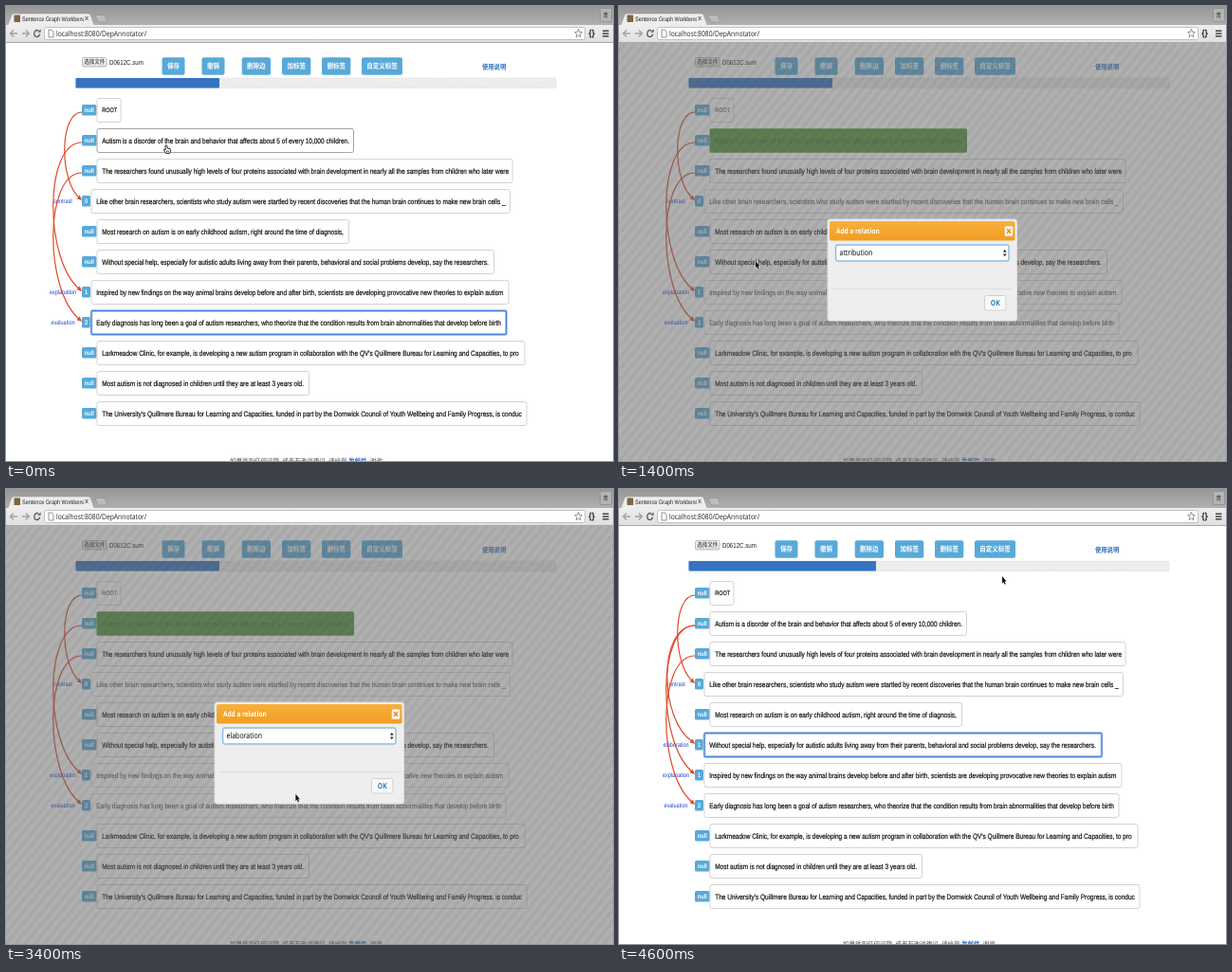
An HTML page with a canvas that plays this animation: 640 by 480 pixels, repeating every 4.8 s.

```html
<!DOCTYPE html>
<html lang="en">
<head>
<meta charset="utf-8">
<title>Sentence tree editor</title>
<style>
html, body { margin: 0; width: 100%; height: 100%; overflow: hidden; background: #fff; }
canvas { display: block; }
</style>
</head>
<body>
<canvas id="stage" width="640" height="480"></canvas>
<script>
const g = document.getElementById('stage').getContext('2d');
g.textRendering = 'geometricPrecision';

const ARIAL = '"Liberation Sans", Arial, sans-serif';
const OPEN = '"Open Sans", sans-serif';
const CJK = '"Noto Sans CJK SC", "Noto Sans CJK", sans-serif';
const BLUE = '#58a9d8', STEP = 200, LOOP = 4800;

// text, right edge of the box, badge ('' means no head yet)
const ROWS = [
  ['ROOT', 121.5, ''],
  ['Autism is a disorder of the brain and behavior that affects about 5 of every 10,000 children.', 367, ''],
  ['The researchers found unusually high levels of four proteins associated with brain development in nearly all the samples from children who later were', 534.5, ''],
  ['Like other brain researchers, scientists who study autism were startled by recent discoveries that the human brain continues to make new brain cells _', 532, '0'],
  ['Most research on autism is on early childhood autism, right around the time of diagnosis,', 362, ''],
  ['Without special help, especially for autistic adults living away from their parents, behavioral and social problems develop, say the researchers.', 515, ''],
  ['Inspired by new findings on the way animal brains develop before and after birth, scientists are developing provocative new theories to explain autism', 530.5, '1'],
  ['Early diagnosis has long been a goal of autism researchers, who theorize that the condition results from brain abnormalities that develop before birth', 527.5, '2'],
  ["Larkmeadow Clinic, for example, is developing a new autism program in collaboration with the QV's Quillmere Bureau for Learning and Capacities, to pro", 547.5, ''],
  ['Most autism is not diagnosed in children until they are at least 3 years old.', 320, ''],
  ["The University's Quillmere Bureau for Learning and Capacities, funded in part by the Dornwick Council of Youth Wellbeing and Family Progress, is conduc", 549.5, '']
];
const BUTTONS = [['保存', 164.5, 24], ['撤销', 206.5, 24], ['删除边', 248.7, 30.3], ['加标签', 291, 30.3], ['删标签', 333, 30.3], ['自定义标签', 375, 43]];
const RELATIONS = ['attribution', 'background', 'cause', 'comparison', 'condition', 'contrast', 'elaboration', 'enablement', 'evaluation',
  'explanation', 'joint', 'manner-means', 'summary', 'temporal', 'topic-change', 'topic-comment', 'same-unit', 'textual'];
// step, x, y of the pointer tip
const PATH = [[0, 169, 147], [3, 169, 147], [5, 144, 269], [8, 144, 269], [10, 259, 258], [12, 259, 258],
  [14, 260, 324], [16, 260, 324], [19, 396, 317], [22, 396, 317], [23, 404, 92]];

const rowY = i => 110 + 32 * i;

// The 1280 x 800 screen is shown at 640 x 480, so all type is scaled by .5 and .6.
function text(s, x, y, size, color = '#111', { font = ARIAL, bold = false, align = 'left', heavy = 0 } = {}) {
  g.save();
  g.translate(x, y + size * 0.21);
  g.scale(0.5, 0.6);
  g.font = `${bold ? 'bold ' : ''}${size}px ${font}`;
  g.textAlign = align;
  g.fillStyle = g.strokeStyle = color;
  g.fillText(s, 0, 0);
  if (heavy) { g.lineWidth = heavy; g.strokeText(s, 0, 0); }
  g.restore();
}

function box(x, y, w, h, r, fill, stroke, width = 1) {
  g.beginPath();
  g.roundRect(x, y, w, h, r);
  if (fill) { g.fillStyle = fill; g.fill(); }
  if (stroke) { g.strokeStyle = stroke; g.lineWidth = width; g.stroke(); }
}

function poly(points, fill, stroke, width = 1, close = true) {
  g.beginPath();
  for (let i = 0; i < points.length; i += 2) g.lineTo(points[i], points[i + 1]);
  if (close) g.closePath();
  if (fill) { g.fillStyle = fill; g.fill(); }
  if (stroke) { g.strokeStyle = stroke; g.lineWidth = width; g.stroke(); }
}

function shade(y0, y1, top, bottom) {
  const s = g.createLinearGradient(0, y0, 0, y1);
  s.addColorStop(0, top);
  s.addColorStop(1, bottom);
  return s;
}

function browser() {
  box(0, 0, 640, 20, 0, shade(0, 20, '#969696', '#b0b0b0'));
  box(0, 20, 640, 18, 0, shade(20, 38, '#eeeeee', '#e0e0e0'));
  box(0, 38, 640, 1, 0, '#a8a8a8');
  poly([2, 20, 6, 9, 8, 8, 87, 8, 89, 9, 93, 20], '#ededed', '#8c8c8c', 0.5, false);
  poly([94, 9.5, 104, 9.5, 107, 17, 97, 17], '#bcbcbc', '#8c8c8c', 0.6);
  box(8.5, 9.5, 6.5, 7.5, 0.5, '#7d6541');
  g.save();
  g.beginPath(); g.rect(16, 8, 66, 12); g.clip();
  text('Sentence Graph Workbench', 17, 13.3, 11, '#222');
  g.restore();
  poly([83.5, 11, 86.5, 15], 0, '#777', 0.8);
  poly([86.5, 11, 83.5, 15], 0, '#777', 0.8);
  box(626.5, 2.5, 12, 14, 1, '#b4b4b4', '#8a8a8a', 0.7);
  text('青', 632.3, 10, 11, '#333', { font: CJK, align: 'center' });

  poly([12, 29, 4.5, 29], 0, '#a2a2a2', 1.4);
  poly([8, 25.5, 4.5, 29, 8, 32.5], 0, '#a2a2a2', 1.4, false);
  poly([17, 29, 24, 29], 0, '#a2a2a2', 1.4);
  poly([20.8, 25.5, 24.3, 29, 20.8, 32.5], 0, '#a2a2a2', 1.4, false);
  g.beginPath();
  g.ellipse(32.7, 29, 2.9, 3.5, 0, 0.2, 5.3);
  g.strokeStyle = '#555'; g.lineWidth = 1.3; g.stroke();
  poly([33.3, 27.8, 36.6, 27.8, 36.6, 24.5], '#555');

  box(40.5, 22.5, 570, 13, 2, '#fff', '#b5b5b5', 0.8);
  poly([45, 25, 48, 25, 50, 27.2, 50, 33, 45, 33], '#fff', '#777', 0.8);
  text('localhost:8080/DepAnnotator/', 53, 28.8, 13.5, '#222', { font: OPEN });
  const star = [];
  for (let i = 0; i < 10; i++) {
    const a = i * Math.PI / 5, r = i % 2 ? 0.45 : 1;
    star.push(603.5 + 4 * r * Math.sin(a), 29 - 4.7 * r * Math.cos(a));
  }
  poly(star, '#fff', '#777', 0.8);
  text('{}', 617.5, 28.3, 17, '#222', { align: 'center', font: OPEN, bold: true });
  for (const y of [25.5, 28.3, 31.1]) box(629, y, 6.5, 1.5, 0, '#444');
}

function header(progress) {
  box(80.5, 54.5, 25.5, 9.5, 1.5, shade(54, 64, '#fbfbfb', '#dedede'), '#a5a5a5', 0.7);
  text('选择文件', 93.3, 59, 11, '#222', { font: CJK, align: 'center' });
  text('D0612C.sum', 109, 59, 12.3, '#222');
  for (const [label, x, w] of BUTTONS) {
    box(x, 54.3, w, 18.4, 2, BLUE);
    text(label, x + w / 2, 63.7, 13, '#fff', { font: CJK, bold: true, align: 'center' });
  }
  text('使用说明', 502, 64, 12.6, '#3470bd', { font: CJK, bold: true });

  box(73.5, 76, 506.5, 10.5, 1, '#f0f0f0');
  g.save();
  g.clip();
  for (let x = 62; x < 582; x += 4) poly([x, 87, x + 9, 76], 0, '#e6e6e6', 0.7);
  g.restore();
  box(73.5, 76, 506.5, 10.5, 1, 0, '#dddddd', 0.5);
  box(73.5, 76, progress - 73.5, 10.5, 1, '#3674c1');
}

function arc(from, to, bulge, label) {
  const y0 = rowY(from) + 2, y1 = rowY(to) - 2, c = 80 - bulge / 0.75;
  g.beginPath();
  g.moveTo(80, y0);
  g.bezierCurveTo(c, y0, c, y1 - 0.2 * (y1 - y0), 78, y1 - 1);
  g.strokeStyle = '#dd4b2b'; g.lineWidth = 1.2; g.stroke();
  poly([80, y1 + 1, 74.5, y1 - 0.8, 77.8, y1 - 4.5], '#dd4b2b');
  text(label, 60, rowY(to), 11, '#1d3fd0', { align: 'center' });
}

function tree({ picked, linked, hover, focus }) {
  ROWS.forEach(([line, right, mark], i) => {
    const head = i === 5 && linked ? '1' : mark;
    const y = rowY(i), left = head ? 89.5 : 95.5;
    const end = i === 5 && linked ? right - 6 : right;
    const off = picked && (i === 0 || head);
    const green = picked && i === 1;
    box(80, y - 6, head ? 9 : 15.5, 11.5, 1.5, BLUE);
    text(head || 'null', head ? 84.5 : 87.8, y - 0.3, 11.2, '#fff', { bold: true, align: 'center' });
    if (green) {
      box(left, y - 12.7, end - left, 25.4, 1.5, '#549640');
    } else if (i === focus) {
      box(left + 0.5, y - 12.5, end - left - 0.5, 25, 1.5, '#fff', '#c4d8f5', 3);
      box(left + 0.5, y - 12.5, end - left - 0.5, 25, 1.5, 0, '#4d84d6', 1.4);
    } else {
      box(left + 0.5, y - 12.5, end - left - 1, 25, 2, '#fff', i === hover ? '#8c8c8c' : off ? '#d6d6d6' : '#c8c8c8', 0.8);
    }
    text(line, left + 5.7, y, i ? 13 : 11, green ? '#3d7030' : off ? '#555' : '#111', { heavy: green ? 0 : off ? 0.15 : 0.35 });
  });
  arc(0, 3, 18, 'contrast');
  if (linked) arc(1, 5, 29, 'elaboration');
  arc(1, 6, 30, 'explanation');
  arc(2, 7, 30, 'evaluation');
}

function footer() {
  const opt = { font: CJK };
  text('如果碰到任何问题, 或者有改进建议, 请给我', 236, 480, 13, '#555', opt);
  text('发邮件', 361, 480, 13, '#3470bd', { ...opt, bold: true });
  text(', 谢谢.', 380.5, 480, 13, '#555', opt);
}

function veil() {
  g.save();
  g.beginPath(); g.rect(0, 39, 640, 441); g.clip();
  box(0, 39, 640, 441, 0, 'rgba(101,101,101,.51)');
  for (let x = -370; x < 650; x += 10) poly([x, 480, x + 367.5, 39], 0, 'rgba(60,60,60,.055)', 3.8, false);
  g.restore();
}

function dialog(value, okHot) {
  box(220, 225, 199.5, 107, 2.5, '#eeeeee', '#dddddd');
  box(222, 227, 195.5, 20.5, 2, shade(227, 248, '#f8b03c', '#f09d22'));
  text('Add a relation', 229, 237.7, 13, '#fff', { font: OPEN, bold: true });
  box(406.5, 232, 9, 11, 1.5, '#f9f4ea', '#dfb06a', 0.7);
  poly([409, 235.3, 413, 239.8], 0, '#ee8a10', 1.4);
  poly([413, 235.3, 409, 239.8], 0, '#ee8a10', 1.4);

  box(228.5, 252, 182.5, 17, 2, '#fff', '#c6deec', 1.8);
  box(228.5, 252, 182.5, 17, 2, 0, '#74b0d4', 0.8);
  text(value, 232.5, 260.5, 14, '#222', { font: OPEN, heavy: 0.2 });
  poly([405, 259.7, 408.6, 259.7, 406.8, 256.7], '#333');
  poly([405, 261.5, 408.6, 261.5, 406.8, 264.5], '#333');

  box(225, 298, 189, 0.8, 0, '#d8d8d8');
  box(385.5, 305.5, 22.5, 15.5, 2, okHot ? '#fdf3cc' : '#f8f8f8', okHot ? '#f0bd4a' : '#cccccc', 0.9);
  text('OK', 396.8, 313.3, 13.5, okHot ? '#c77405' : '#1c84b8', { font: OPEN, bold: true, align: 'center' });
}

function menu(pointerY) {
  const pitch = 11.18, top = 255.3;
  const active = Math.floor((pointerY + 1 - top) / pitch);
  g.save();
  g.shadowColor = 'rgba(0,0,0,.45)';
  g.shadowBlur = 7;
  g.shadowOffsetY = 3;
  box(224, 252.5, 183, 207.5, [0, 0, 2, 2], 'rgba(255,255,255,.97)');
  g.restore();
  RELATIONS.forEach((name, i) => {
    const y = top + pitch * (i + 0.5), on = i === active;
    if (on) box(224, y - 5.6, 183, pitch, 0, shade(y - 5.6, y + 5.6, '#4d78f0', '#1a46ea'));
    text(name, 233.3, y, 14, on ? '#fff' : '#111', { font: OPEN, heavy: 0.2 });
    if (!i) text('✓', 225.5, y, 13, on ? '#fff' : '#111', { font: '"DejaVu Sans", sans-serif' });
  });
}

function pointer(x, y, hand) {
  g.save();
  g.translate(x, y);
  g.lineJoin = 'round';
  if (hand) {
    poly([-1, 0.5, 0, -0.3, 1, 0.5, 1, 3, 4, 3.6, 4.6, 4.6, 4.4, 6.5, 3.4, 8.6, -0.2, 8.6, -2.6, 5.2, -2.2, 4.3, -1, 5], '#fff', '#111', 0.9);
    poly([0.6, 5.5, 0.6, 7.3], 0, '#111', 0.5);
    poly([2.2, 5.5, 2.2, 7.3], 0, '#111', 0.5);
  } else {
    const arrow = [0, 0, 0, 7.6, 1.5, 6.1, 2.6, 8.8, 3.7, 8.2, 2.7, 5.6, 4.6, 5.5];
    poly(arrow, 0, '#fff', 1);
    poly(arrow, '#111');
  }
  g.restore();
}

function pointerAt(step) {
  const n = Math.max(1, PATH.findIndex(p => p[0] >= step));
  const [a, b] = [PATH[n - 1], PATH[n]];
  const f = (step - a[0]) / (b[0] - a[0]);
  return [a[1] + (b[1] - a[1]) * f, a[2] + (b[2] - a[2]) * f];
}

function draw(step) {
  const linked = step >= 22, picked = step >= 2 && !linked;
  const asking = step >= 7 && !linked, open = step >= 12 && step < 17;
  const okHot = step >= 19 && asking;
  const [x, y] = pointerAt(step);
  box(0, 0, 640, 480, 0, '#fff');
  header(step === 23 ? 271 : step === 22 ? 245 : 225);
  tree({
    picked, linked,
    hover: step < 4 ? 1 : step >= 5 && step < 7 ? 5 : -1,
    focus: linked ? 5 : picked ? -1 : 7
  });
  footer();
  if (asking) {
    veil();
    dialog(step < 17 ? 'attribution' : 'elaboration', okHot);
    if (open) menu(y);
  }
  browser();
  pointer(x, y, step < 7 || okHot);
}

const start = performance.now();
function tick() {
  const t = (performance.now() - start) % LOOP;
  draw(Math.floor(t / STEP));
  requestAnimationFrame(tick);
}
tick();
</script>
</body>
</html>
```
